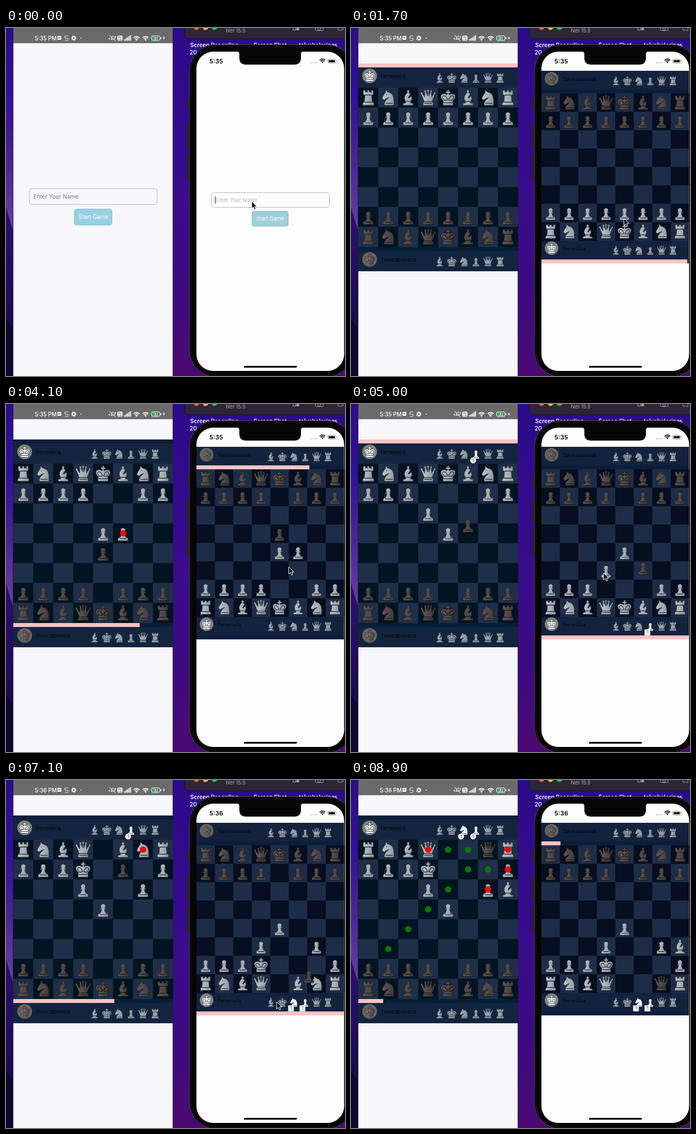
An HTML page with a canvas for the animation above (9 s loop, 600 by 618 pixels).

```html
<!DOCTYPE html>
<html lang="en">
<head>
<meta charset="utf-8">
<title>Two-player chess</title>
<style>
html, body { margin: 0; width: 100%; height: 100%; overflow: hidden; background: #2a0a80; }
canvas { display: block; width: 600px; height: 618px; }
</style>
</head>
<body>
<canvas id="stage" width="600" height="618"></canvas>
<script>
const ctx = document.getElementById('stage').getContext('2d');
const LOOP = 9000, START = 1585, SLIDE = 100, TURN = 1500;
const WHITE_NAME = 'Fenwilora', BLACK_NAME = 'Tolvirabenesk';

// Turns: select time, move time, "from to" as column-row pairs, free squares, captures, extra lag
const turns = [
  [1850, 2097, '4644', '45 44', ''],
  [2950, 3250, '4143', '42 43', ''],
  [3500, 3650, '5654', '55 54', ''],
  [3950, 4130, '4354', '', '54'],
  [4450, 4620, '3635', '35 34', ''],
  [4780, 4918, '5455', '55', ''],
  [5300, 5415, '6665', '65 64', '55'],
  [5840, 6040, '5556', '56', ''],
  [6300, 6412, '4736', '46 36', '56'],
  [6880, 7042, '5667', '', '67', 22],
  [7400, 7495, '5775', '46 66 75', ''],
  [8650, 9999, '6767', '47 57 56 66 45 34 23 12', '37 77 76 65']
];

// Pointer: time, x, y
const pointer = [
  [0, 435, 308], [600, 467, 337], [1500, 470, 337], [1700, 483, 338], [1900, 484, 329],
  [2090, 484, 263], [2600, 390, 290], [3100, 245, 327], [3480, 515, 329], [3640, 515, 263],
  [4150, 500, 290], [4440, 450, 330], [4610, 450, 297], [5000, 447, 300], [5290, 548, 330],
  [5410, 549, 300], [5900, 549, 304], [6290, 484, 360], [6410, 451, 328], [7100, 479, 394],
  [7390, 516, 360], [7490, 582, 297], [7900, 620, 290]
];

const shapes = {
  p: 'M-9 13.5V10Q-9 8-5 7Q-3 4-2.6 0H-5V-2H-2.5A4.2 4.2 0 1 1 2.5-2H5V0H2.6Q3 4 5 7Q9 8 9 10V13.5Z',
  r: 'M-10 13.5V10L-7 7L-6-4L-9-6V-13H-5V-10H-2V-13H2V-10H5V-13H9V-6L6-4L7 7L10 10V13.5Z',
  n: 'M-7 13.5V10Q-6 5 1 0Q-4 1-7 4Q-10 4-11 1Q-8-6-5-9L-5-14L-1-10Q9-9 10 3V13.5Z',
  b: 'M-9 13.5V10.5L-4 9L-5 6Q-8 2-6-3Q-4-8-1-9A2.3 2.3 0 1 1 1-9Q3-8 4-6L0 0L1 1L6-3Q8 2 5 6L4 9L9 10.5V13.5Z',
  q: 'M-9 13.5V10L-7 7L-12-6A1.8 1.8 0 1 1-10-7L-6-1L-6-10A1.8 1.8 0 1 1-4-10L-1-3V-11A1.8 1.8 0 1 1 1-11V-3L4-10A1.8 1.8 0 1 1 6-10L6-1L10-7A1.8 1.8 0 1 1 12-6L7 7L9 10V13.5Z',
  k: 'M-9 13.5V9L-8 6Q-15 0-12-5Q-7-9-2-5L-1-8H-4V-11H-1.3V-14H1.3V-11H4V-8H1L2-5Q7-9 12-5Q15 0 8 6L9 9V13.5Z'
};
const inner = {
  p: 'M-6 9.5H6', r: 'M-7 8H7M-6-4.5H6', n: 'M-5 10H8M-4-5H-3', b: 'M-4 6.5H4',
  q: 'M-7 7H7M-7 10H7', k: 'M-6 5Q-12 0-9-3Q-4-5-1 4ZM6 5Q12 0 9-3Q4-5 1 4ZM-8 9H8'
};
for (const set of [shapes, inner]) for (const k in set) set[k] = new Path2D(set[k]);

const leftGame = {
  x: 13, y: 106, cell: 35.3, w: 282, flip: true, lag: 40, bars: [63, 389], panels: [70, 396], panelH: 36,
  avatars: [85, 411], ax: 33, ar: 13, nameX: 52.5, font: 9.6, icons: 157, gap: 21.4,
  dark: '#021421', light: '#1f2f49', panel: '#13253e', back: '#071f37', top: 63, bottom: 432
};
const rightGame = {
  x: 337, y: 116, cell: 32.7, w: 261, flip: false, lag: 0, bars: [109, 411], panels: [76, 378], panelH: 33,
  avatars: [90, 391], ax: 355, ar: 12, nameX: 374, font: 9.1, icons: 469, gap: 20.2,
  dark: '#060e20', light: '#1d2d48', panel: '#13233d', back: '#0d1e3b', top: 76, bottom: 418
};

function rect(x, y, w, h, fill, r = 0, stroke) {
  ctx.beginPath();
  ctx.roundRect(x, y, w, h, r);
  if (fill) { ctx.fillStyle = fill; ctx.fill(); }
  if (stroke) { ctx.strokeStyle = stroke; ctx.lineWidth = 1; ctx.stroke(); }
}
function disc(x, y, r, fill) {
  ctx.beginPath();
  ctx.arc(x, y, r, 0, 7);
  ctx.fillStyle = fill;
  ctx.fill();
}
function text(s, x, y, size, fill, weight = 400) {
  ctx.font = `${weight} ${size}px Inter, sans-serif`;
  ctx.fillStyle = fill;
  ctx.fillText(s, x, y);
}
function path(d, fill, stroke, width = 1) {
  const p = new Path2D(d);
  if (fill) { ctx.fillStyle = fill; ctx.fill(p); }
  if (stroke) { ctx.strokeStyle = stroke; ctx.lineWidth = width; ctx.stroke(p); }
}
function vertical(y0, y1, stops) {
  const g = ctx.createLinearGradient(0, y0, 0, y1);
  stops.forEach((c, i) => g.addColorStop(i / (stops.length - 1), c));
  return g;
}
function wifi(x, y, color) {
  ctx.strokeStyle = color;
  ctx.lineWidth = 1.5;
  for (const r of [2, 4.5, 7]) {
    ctx.beginPath();
    ctx.arc(x, y, r, -Math.PI * .76, -Math.PI * .24);
    ctx.stroke();
  }
  disc(x, y - .5, 1.1, color);
}
function piece(kind, white, x, y, scale, alpha = 1, tone) {
  ctx.save();
  ctx.translate(x, y);
  ctx.scale(scale, scale);
  ctx.globalAlpha = alpha;
  const g = ctx.createLinearGradient(-11, 0, 11, 0);
  const colors = tone || (white ? ['#c2c7cb', '#92989f'] : ['#625958', '#3e3838']);
  colors.forEach((c, i) => g.addColorStop(i, c));
  ctx.fillStyle = g;
  ctx.strokeStyle = white ? '#1c2632' : '#1b1718';
  ctx.lineWidth = .8;
  ctx.fill(shapes[kind]);
  ctx.stroke(shapes[kind]);
  ctx.lineWidth = 1.2;
  ctx.stroke(inner[kind]);
  ctx.restore();
}

// Position, sliding piece, selection and lost pieces as one device knows them
function gameAt(t, left) {
  const board = {};
  const s = { t, board, lost: '', move: null, select: null, since: START, white: true };
  [...'rnbqkbnr'].forEach((k, c) => {
    board[`${c}0`] = [k, false];
    board[`${c}1`] = ['p', false];
    board[`${c}6`] = ['p', true];
    board[`${c}7`] = [k, true];
  });
  for (const [i, turn] of turns.entries()) {
    const [pick, at, squares, , , extra = 0] = turn;
    const white = i % 2 == 0, start = at + (left ? extra : 0);
    const from = squares.slice(0, 2), to = squares.slice(2);
    if (t < start) {
      if (t >= pick && left != white) s.select = turn;
      break;
    }
    if (board[to]) s.lost += board[to][0];
    s.since = start;
    s.white = !white;
    const man = board[from];
    delete board[from];
    if (t < start + SLIDE) s.move = { man, from, to, k: (t - start) / SLIDE };
    else board[to] = man[0] == 'p' && !man[1] && to[1] == 7 ? ['q', false] : man;
  }
  return s;
}

function drawPanel(d, white, s) {
  const i = white == d.flip ? 0 : 1, ay = d.avatars[i];
  rect(d.x, d.panels[i], d.w, d.panelH, d.panel);
  const size = d.cell / 35.3;
  disc(d.ax, ay, d.ar, white ? '#85827f' : '#6b6664');
  piece('k', white, d.ax, ay, size * .72, 1, white ? ['#fff', '#eee'] : ['#8b8380', '#5d5553']);
  text(white ? WHITE_NAME : BLACK_NAME, d.nameX, ay + 3.7, d.font, '#02060c');
  [...'bknpqr'].forEach((kind, n) => {
    const x = d.icons + n * d.gap, y = ay + 3.7, gone = white && s.lost.includes(kind);
    piece(kind, true, x, y, size * .64, 1, gone ? ['#fff', '#fff'] : ['#a9b0b7', '#8b939c']);
    if (!gone) return;
    if (d.flip) disc(x - 5, y + 11.5, 5.3, '#f4f5f7');
    else rect(x - 10, y + 5.5, 10, 10.5, '#fff');
    text('1', x - 6.3, y + (d.flip ? 14 : 13), 7, '#222');
  });
  if (s.white == white) {
    const rest = 1 - Math.max(0, s.t - s.since - SLIDE) / TURN;
    rect(d.x, d.bars[i], d.w * Math.max(0, rest), 7, '#fdc3c3');
  }
}

function drawGame(d, t) {
  const s = gameAt(t, d.flip);
  rect(d.x, d.top, d.w, d.bottom - d.top, d.back);
  drawPanel(d, true, s);
  drawPanel(d, false, s);
  const spot = q => {
    const r = d.flip ? 7 - q[1] : +q[1];
    return [d.x + (+q[0] + .5) * d.cell, d.y + (r + .5) * d.cell];
  };
  const size = d.cell / 35.3;
  for (let r = 0; r < 8; r++) for (let c = 0; c < 8; c++) {
    const shade = (r + c) % 2 == (d.flip ? 0 : 1) ? d.dark : d.light;
    rect(d.x + c * d.cell, d.y + r * d.cell, d.cell + .3, d.cell + .3, shade);
  }
  for (const q in s.board) {
    const [kind, white] = s.board[q];
    const pressed = s.select && s.select[2].startsWith(q) && t - s.select[0] < 90;
    piece(kind, white, ...spot(q), size, pressed ? .25 : 1);
  }
  if (s.move) {
    const { man, from, to, k } = s.move, a = spot(from), b = spot(to);
    piece(...man, a[0] + (b[0] - a[0]) * k, a[1] + (b[1] - a[1]) * k, size);
  }
  if (s.select) {
    const dots = (list, color) => list.split(' ').filter(Boolean)
      .forEach(q => disc(...spot(q), 5.6 * size, color));
    dots(s.select[3], '#057a05');
    dots(s.select[4], '#fb0505');
  }
}

// Returns the x of the text caret
function drawLogin(x, y, w, h, size, name, typed, btn, fill, edge) {
  rect(x + .5, y + .5, w, h, null, 4, '#b9babd');
  const entry = name.slice(0, Math.max(0, Math.floor(typed)));
  const hint = x < 300 ? '#77777b' : '#b8b8bc';
  text(entry || 'Enter Your Name', x + 7.5, y + h / 2 + size * .36 + .5, size, entry ? '#161616' : hint);
  const caret = x + 7.5 + ctx.measureText(entry).width;
  rect(...btn, fill, 4, edge);
  text('Start Game', btn[0] + 7.3, btn[1] + btn[3] / 2 + size * .36, size, '#fff');
  return caret;
}

function drawDesktop(active) {
  rect(0, 0, 600, 618, vertical(0, 618, ['#2b0b8a', '#330b8e', '#390c8c', '#3c0a80', '#4b0a72']));
  rect(0, 0, 13, 618, vertical(0, 360, ['#2a0d86', '#30109a', '#4a2592', '#6a40a4']));
  path('M0 318L13 362V618H0Z', vertical(318, 618, ['#2c1070', '#200b58', '#150736']));
  path('M0 516L13 536V618H0Z', '#0f0630');
  const label = active ? '#f1eef8' : '#c3bdd6';
  text('Screen Recording', 326, 34, 10, label, 600);
  text('Screen Shot', 438, 34, 10, label, 600);
  text('tolvabelorinas', 518, 34, 10, label, 600);
  text('20', 325, 47, 10, label, 600);
  rect(316, -20, 300, 39, active ? '#2c2638' : '#332b40', 8, '#191325');
  ['#fc5b57', '#fdbc2e', '#2ac840'].forEach((c, i) => disc(337 + 16 * i, -1.5, 5, active ? c : '#57505f'));
  const ink = active ? '#aaa6b2' : '#7f7989';
  text('Nel 15.5', 389, 8, 9.5, ink);
  rect(508, -4, 4.5, 8, null, 0, ink);
  rect(514, -4, 4.5, 8, ink);
  rect(547.5, -4, 14, 8.5, null, 2, ink);
  ctx.beginPath(); ctx.arc(554.5, 0, 3, 0, 7); ctx.stroke();
  rect(587.5, -4, 9, 8, null, 1, ink);
}

function drawLeftPhone(t, clock, late) {
  rect(12, 0, 284, 618, '#26105c');
  rect(13, 0, 282, 618, '#f7f6f8');
  rect(13, 0, 282, 27, '#6b6a6b');
  text(clock + ' PM', 51, 21.5, 9.8, '#fff', 500);
  rect(91, 14, 7, 7, '#fff', 1);
  path('M92 16.5H97M92 18.5H95', null, '#6b6a6b', .8);
  path('M110 14H106Q104 14 104 16T106 18H108Q110 18 110 20T108 22H104', null, '#ddd', 1.1);
  ctx.setLineDash([1.6, 1.2]);
  ctx.beginPath(); ctx.arc(120, 18, 3.6, 0, 7);
  ctx.strokeStyle = '#fff'; ctx.lineWidth = 1.6; ctx.stroke();
  ctx.setLineDash([]);
  ctx.beginPath(); ctx.arc(120, 18, 2.5, 0, 7); ctx.stroke();
  disc(133, 18, .9, '#fff');
  path('M185 20Q188 19 187 16Q188 13 191 15L192 20ZM183 13L194 23M183 17V21M194 14V18', null, '#fff', 1);
  rect(197, 13.5, 9, 9, '#fff', 1.5);
  text('Vo', 198, 18, 5, '#666', 700);
  text('LTE', 198, 22, 4, '#666', 700);
  for (let i = 0; i < 5; i++) rect(209 + i * 2.6, 20 - i * 1.8, 1.8, 2.5 + i * 1.8, '#fff');
  wifi(231, 22, '#fff');
  wifi(247, 22, '#fff');
  rect(257.5, 14, 15, 8, null, 2.5, '#fff');
  rect(258.5, 15, 7, 6, '#22c03c', 1.5);
  rect(273.5, 16.5, 1.5, 3, '#fff');
  text(late ? '32' : '31', 262, 20.6, 6, '#fff', 600);
  path('M280 14L277.5 18.5H279.5L278.5 22L281.5 17.3H279.5Z', '#fff');
  if (t < START) {
    drawLogin(41, 285, 226, 28, 10, BLACK_NAME, (t - 750) / 45,
      [121, 321.5, 66.5, 28.5], '#98cfe3', '#86c3da');
  } else drawGame(leftGame, t);
}

function drawRightPhone(t, clock) {
  for (const [y, h] of [[124, 20], [168, 46], [223, 48]]) rect(320, y, 5, h, '#25222c', 1.5);
  rect(324.5, 29.5, 290, 590, '#050506', 47, '#48464e');
  rect(327, 32, 285, 585, null, 44, '#1d1c20');
  ctx.save();
  ctx.beginPath();
  ctx.roundRect(337, 42, 261.5, 567, 30);
  ctx.clip();
  rect(337, 42, 262, 567, '#fdfdfe');
  if (t < START) {
    const caret = drawLogin(363, 292, 209, 26, 9.3, WHITE_NAME, (t - 150) / 45,
      [435.5, 325.5, 64, 26.5], '#a0cedb', '#85b5c3');
    rect(caret - .8, 299, 1.5, 13, '#4461c9');
  } else drawGame(rightGame, t);
  ctx.restore();
  path('M409 42Q413 42 413 46V53Q413 65 425 65H510Q522 65 522 53V46Q522 42 526 42Z', '#050506');
  text(clock, 360, 62.5, 11, '#050505', 600);
  for (let i = 0; i < 4; i++) disc(540.7 + i * 3.2, 61.5, .9, '#aaa');
  wifi(560, 62, '#111');
  rect(569.5, 55.5, 14, 7, null, 2, '#999');
  rect(571, 57, 11, 4, '#050505', 1);
  rect(584.6, 57.7, 1, 2.6, '#999');
  rect(421, 600, 94, 3.2, '#050505', 1.6);
}

function drawPointer(t) {
  const i = pointer.findIndex(k => k[0] > t);
  if (i < 1) return;
  const [t0, x0, y0] = pointer[i - 1], [t1, x1, y1] = pointer[i];
  const u = (t - t0) / (t1 - t0), k = u * u * (3 - 2 * u);
  ctx.save();
  ctx.translate(x0 + (x1 - x0) * k, y0 + (y1 - y0) * k);
  path('M0 0V12.5L3 9.8L5 14.4L7.2 13.4L5.2 9H9Z', '#080808', '#f5f5f5', 1);
  ctx.restore();
}

const begin = performance.now();
function frame(now) {
  const t = Math.max(0, now - begin) % LOOP, clock = t < 5400 ? '5:35' : '5:36';
  drawDesktop(t < 2800 || t >= 3400);
  drawLeftPhone(t - leftGame.lag, clock, t >= 2500);
  drawRightPhone(t - rightGame.lag, clock);
  drawPointer(t);
  requestAnimationFrame(frame);
}
frame(begin);
</script>
</body>
</html>
```
